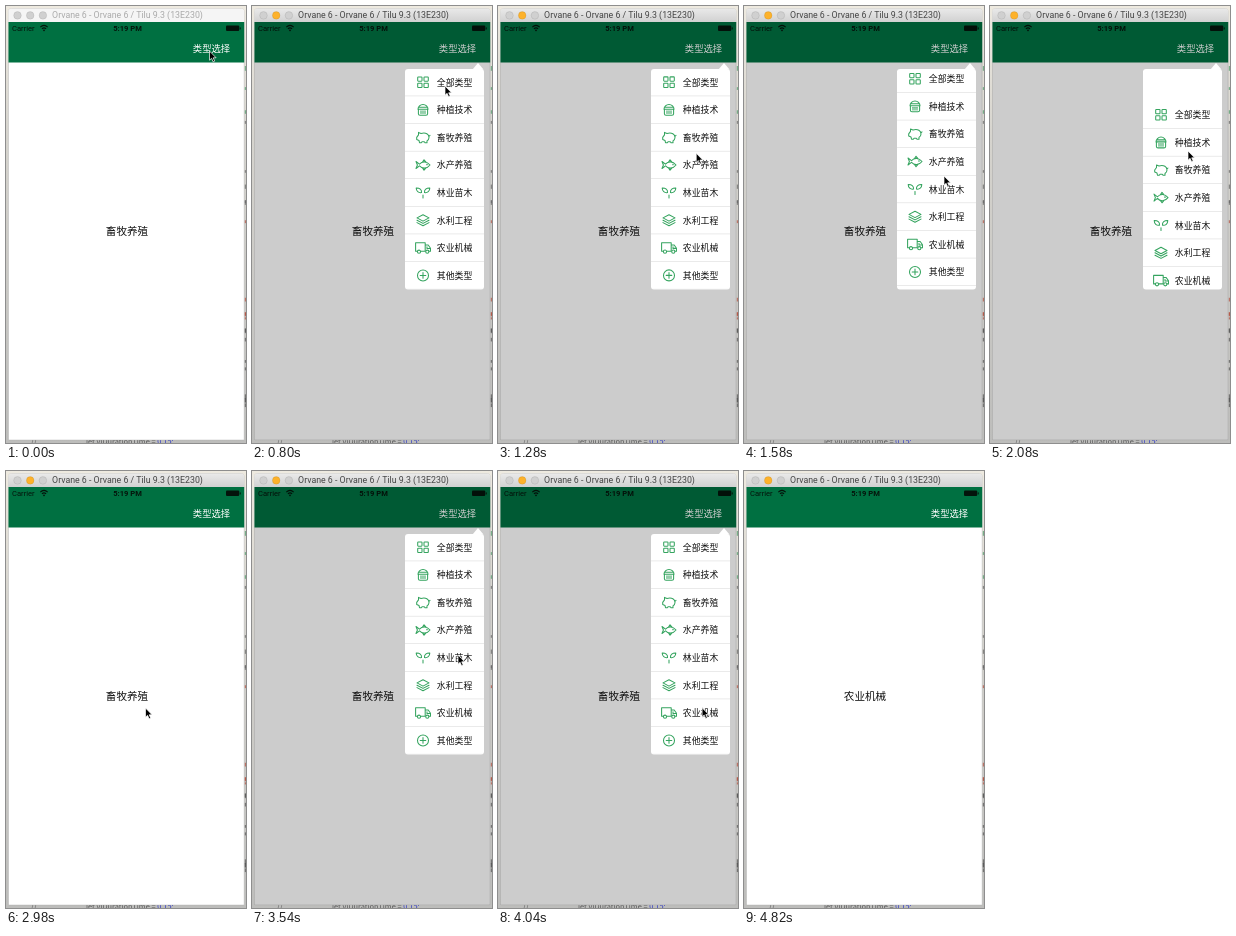
An HTML page that plays this animation: 240 by 437 pixels, repeating every 4.84 s.

```html
<!DOCTYPE html>
<html lang="zh-CN">
<head>
<meta charset="utf-8">
<title>类型选择</title>
<style>
  html, body { margin: 0; width: 100%; height: 100%; overflow: hidden; background: #dedbd5; }
  svg { display: block; width: 240px; height: 437px; }
  text { font-family: "Noto Sans CJK SC", "Noto Sans CJK", sans-serif; }
  .latin { font-family: Roboto, "Liberation Sans", sans-serif; }
  .code { font-family: "DejaVu Sans Mono", monospace; font-size: 7.4px; }
  .icon { fill: none; stroke: #35a45f; stroke-width: 1.05; stroke-linejoin: round; stroke-linecap: round; }
</style>
</head>
<body>
<svg viewBox="0 0 240 437" xmlns="http://www.w3.org/2000/svg">
  <defs>
    <linearGradient id="barFill" x2="0" y2="1">
      <stop stop-color="#e9e9e9"/><stop offset="1" stop-color="#d1d1d1"/>
    </linearGradient>
    <linearGradient id="edge" x2="0" y2="1">
      <stop stop-color="#eeeae0"/><stop offset=".3" stop-color="#d6d4ce"/><stop offset="1" stop-color="#bdbdbb"/>
    </linearGradient>
    <clipPath id="panel"><rect x="153" y="63" width="79" height="220.5" rx="3"/></clipPath>
  </defs>

  <!-- editor behind the window -->
  <rect width="240" height="437" fill="url(#edge)"/>
  <g id="marks"></g>
  <g class="code" fill="#555">
    <text x="25" y="437.8">//</text>
    <text x="80" y="437.8">let viDurationTime = <tspan fill="#2a35c4">0.15;</tspan></text>
  </g>

  <!-- window -->
  <path d="M2.5 434V5.5Q2.5 2.5 5.5 2.5H235.2Q238.2 2.5 238.2 5.5V434Z" fill="#fff" stroke="#aaa" stroke-width=".4"/>
  <path id="bar" d="M2.5 16V5.5Q2.5 2.8 5.2 2.8H235.5Q238.2 2.8 238.2 5.5V16Z"/>
  <g id="lights" stroke="#000" stroke-opacity=".15" stroke-width=".5"></g>
  <text id="caption" class="latin" x="121.5" y="12.4" font-size="8.8" text-anchor="middle">Orvane 6 - Orvane 6 / Tilu 9.3 (13E230)</text>

  <!-- app screen -->
  <rect x="2.5" y="16" width="235.7" height="40.5" fill="#007041"/>
  <g fill="#04140b">
    <text class="latin" x="6" y="25" font-size="7.6">Carrier</text>
    <text class="latin" x="121.5" y="25" font-size="7.6" font-weight="600" text-anchor="middle">5:19 PM</text>
    <path d="M34.3 21.2Q38 17.7 41.7 21.2M35.9 22.9Q38 20.9 40.1 22.9" fill="none" stroke="#04140b" stroke-width="1.1"/>
    <circle cx="38" cy="24.3" r=".9"/>
    <rect x="220" y="19.5" width="13.2" height="5.6" rx="1"/>
    <rect x="233.7" y="21.2" width="1" height="2.2" rx=".5"/>
  </g>
  <text x="186.8" y="45.6" font-size="9.35" font-weight="300" fill="#fff">类型选择</text>
  <text id="choice" x="121" y="229.4" font-size="10.6" text-anchor="middle" fill="#111"></text>

  <!-- drop-down -->
  <g id="menu">
    <rect x="2.5" y="16" width="235.7" height="418" opacity=".2"/>
    <path d="M220.5 63.5L226 57L231.5 63.5Z" fill="#fff"/>
    <rect x="153" y="63" width="79" height="220.5" rx="3" fill="#fff"/>
    <g clip-path="url(#panel)"><g id="rows"></g></g>
  </g>

  <path id="cursor" d="M0 0V9.2L2.1 7.3L3.6 10.8L5.2 10.1L3.7 6.8H6.6Z" fill="#000" stroke="#fff" stroke-width=".7"/>
</svg>
<script>
const LOOP = 4840, ROW = 27.6, FADE = 150;
const WAKE = 260;
const visits = [{ open: 380, close: 2700 }, { open: 3290, close: 4300 }];
const PICK = visits[1].close;

const $ = id => document.getElementById(id);
const path = d => `<path d="${d}"/>`;
const circle = (x, y, r) => `<circle cx="${x}" cy="${y}" r="${r}"/>`;
const box = (x, y, w, h, r = 0) => `<rect x="${x}" y="${y}" width="${w}" height="${h}" rx="${r}"/>`;
const mirror = s => s + `<g transform="scale(-1 1)">${s}</g>`;

// Icons are drawn around 0,0.
const grid = mirror(box(1, -5.3, 4.3, 4.3, .6) + box(1, 1, 4.3, 4.3, .6));
const basket = path('M-5-.5A5 4.8 0 0 1 5-.5ZM-4.6-.5V4Q-4.6 5.5-3 5.5H3Q4.6 5.5 4.6 4V-.5M-3.5-2.5H3.5') +
  [-2, 0, 2].map(x => path(`M${x} 1V3.8`)).join('');
const pig = path('M-6.3 0L-4.5-2.5V-5L-2-4C3-5.5 6-3 6 0Q6 2 4 3.5V5.3H2L1.3 4.3H-1L-1.7 5.3H-3.5L-4 3L-6.3 2ZM6-1L7-2');
const fish = path('M7 0C4-4-1-4-3.5-.8L-7-3.5L-5.6 0L-7 3.5L-3.5.8C-1 4 4 4 7 0ZM-.5-3L1-5.2L3-2.8M-.5 3L1 5.2L3 2.8') + circle(4, -.4, .3);
const sprout = mirror(path('M1.5 0C1-3 3.5-4.8 6.8-4.6C6.8-1.5 4.5.6 1.5 0Z')) + path('M0 5.3V2.5');
const layers = [2.4, 0].map(y => path(`M-6 ${y}L0 ${y + 3.2}L6 ${y}`)).join('') + path('M0-5.5L6-2.3L0 .9L-6-2.3Z');
const truck = path('M-5.6 3.5H-7.4V-5H2.2V3.5H-2.4M2.2-2.8H5.2L7.5.4V3.5H6M4-1V.6H7') + circle(-4, 3.9, 1.6) + circle(4.3, 3.9, 1.6);
const plus = circle(0, 0, 5.5) + path('M-2.8 0H2.8M0-2.8V2.8');

const items = [
  ['全部类型', grid], ['种植技术', basket], ['畜牧养殖', pig], ['水产养殖', fish],
  ['林业苗木', sprout], ['水利工程', layers], ['农业机械', truck], ['其他类型', plus]
];

$('rows').innerHTML = items.map(([name, icon], i) => `
  <g transform="translate(153 ${76.2 + i * ROW})">
    <g class="icon" transform="translate(18 0)">${icon}</g>
    <text x="31.8" y="3.4" font-size="8.9" fill="#111">${name}</text>
    <rect y="13.5" width="79" height=".5" fill="#d4d4d4"/>
  </g>`).join('');

$('lights').innerHTML = [0, 1, 2].map(i => circle(11.5 + i * 12.7, 9.4, 3.8)).join('');

// Scraps of code showing past the right edge.
let seed = 7;
const random = () => (seed = seed * 16807 % 2147483647) / 2147483647;
const inks = ['#4c9a68', '#666', '#b5503f', '#555'];
$('marks').innerHTML = Array.from({ length: 22 }, () => {
  const y = 60 + random() * 360;
  const ink = inks[Math.floor(y / 105)];
  return `<rect x="238.7" y="${y}" width="1.3" height="${2 + random() * 3}" fill="${ink}" opacity=".7"/>`;
}).join('');

const smooth = u => u * u * (3 - 2 * u);
const ramp = (t, from, length) => smooth(Math.min(1, Math.max(0, (t - from) / length)));
const bump = (t, peak, width) => Math.exp(-(((t - peak) / width) ** 2));

// Places the pointer visits: [time, x, y].
const stops = [
  [0, 203.5, 45], [WAKE, 203.5, 45], [800, 193, 80], [1580, 200, 170], [2080, 198, 145],
  [2980, 139.5, 237], [3270, 206, 44], [3540, 206, 184], [4200, 204, 240], [LOOP, 250, 290]
];

function pointer(t) {
  const i = stops.findIndex(s => s[0] > t);
  const [t0, x0, y0] = stops[i - 1], [t1, x1, y1] = stops[i];
  const e = smooth(ramp(t, t0, t1 - t0));
  return [x0 + (x1 - x0) * e, y0 + (y1 - y0) * e];
}

// The list is tugged up a little, then pulled down and springs back.
const scroll = t => 32.6 * bump(t, 2080, 130) - 3.5 * bump(t, 1580, 110);
const shown = t => visits.reduce((sum, v) => sum + ramp(t, v.open, FADE) - ramp(t, v.close, FADE), 0);

function draw(t) {
  const active = t >= WAKE;
  $('bar').setAttribute('fill', active ? 'url(#barFill)' : '#f5f5f5');
  $('caption').setAttribute('fill', active ? '#444' : '#aaa');
  [...$('lights').children].forEach((c, i) => c.setAttribute('fill', active && i === 1 ? '#fdb22b' : '#d0d0d0'));
  $('choice').textContent = items[t < PICK ? 2 : 6][0];
  $('menu').setAttribute('opacity', shown(t));
  $('rows').setAttribute('transform', `translate(0 ${scroll(t)})`);
  $('cursor').setAttribute('transform', `translate(${pointer(t)})`);
}

const start = performance.now();
function tick() {
  draw((performance.now() - start) % LOOP);
  requestAnimationFrame(tick);
}
tick();
</script>
</body>
</html>
```
